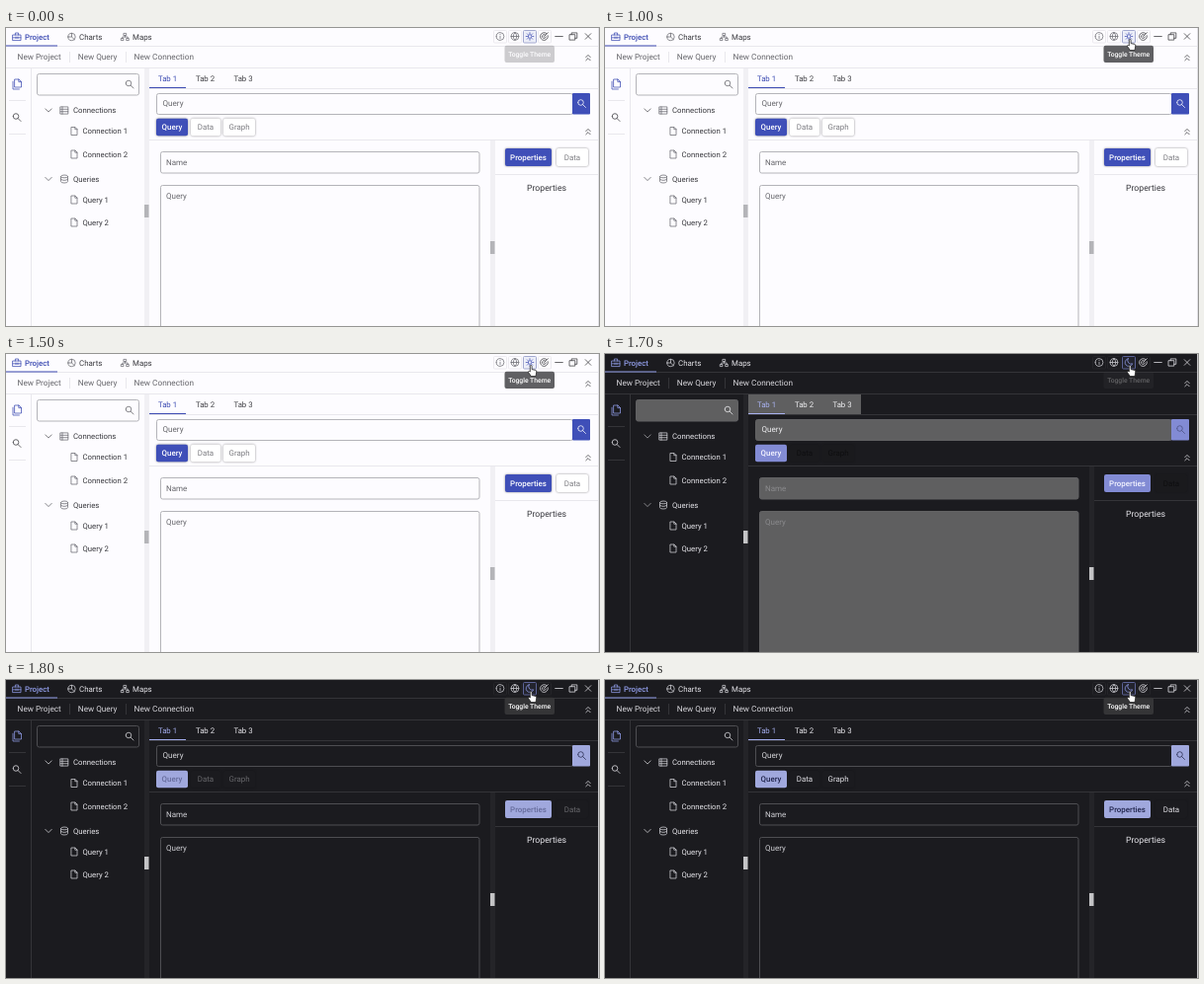
Write an HTML page that moves like this. It is 600 px wide and 302 px high and loops after 2.7 s.

```html
<!DOCTYPE html>
<html lang="en">
<head>
<meta charset="utf-8">
<title>Theme toggle</title>
<style>
html, body { margin: 0; width: 100%; height: 100%; overflow: hidden; }
svg { display: block; width: 600px; height: 302px; background: var(--bg); }
text { font: 400 7.9px Roboto, Arial, sans-serif; fill: var(--ink); text-rendering: geometricPrecision; }
.mid { text-anchor: middle; }
.bold { font-weight: 500; }
.icon { fill: none; stroke-width: .75; stroke-linecap: round; stroke-linejoin: round; }
.raised { filter: drop-shadow(0 .5px .8px var(--shade)); }
</style>
</head>
<body>
<svg id="stage" viewBox="0 0 600 302"></svg>
<script>
// Light value, then one value per 100 ms from the switch; the last one holds.
const colors = {
  bg: '#fdfcff #1b1b1f',
  line: '#e9e8ed #343438',
  gutter: '#f1f0f4 #242428',
  ink: '#38383d #e6e5ea',
  icon: '#6a6a70 #d2d2d7',
  tool: '#66666b #d8d7dc',
  primary: '#3c4bb2 #929eea',
  frame: '#eceaef #252529',
  focus: '#a3a9cf #5c6396',
  focusFill: '#eceef8 #23242e',
  field: '#fdfcff #cac9cd #5f5f60 #1b1b1f',
  edge: '#b4b4b9 #c4c3c7 #626264 #4e4e52',
  find: '#66666b #f2f2f4 #eeeef0 #d6d6da',
  label: '#66666b #6a696d #8b8b8d #cfcfd4',
  tabs: '#fdfcff #cac9cd #5f5f60 #1b1b1f',
  tabOn: '#3c4bb2 #8f9ce4 #a9b2f0 #a3acec',
  tabOff: '#404045 #f4f4f6 #f0f0f2 #e6e5ea',
  fill: '#3f4fb8 #4f5fbe #828bd4 #a0a8dd',
  onFill: '#ffffff #ffffff #f4f4ff #666c9c #2c3060 #20244c',
  lens: '#ffffff #d8dcf0 #4a4f80 #24284c',
  alt: '#ffffff #1a1a1d #1a1a1d #1b1b1f',
  onAlt: '#7c7c81 #0a0a0c #0e0e10 #68686c #b5b5ba #e2e1e6',
  shade: '#00000070 #00000030',
  chevron: '#5a5a60 #2c2c30 #a8a8ad #d8d8dc',
  tip: '#606063 #353537',
  grip: '#b4b4b8 #c4c4c6',
  rim: '#e2e1e6 #c8c8ca'
};
for (const k in colors) colors[k] = colors[k].split(' ');

const v = name => `var(--${name})`;
const text = (x, y, s, color = 'ink', size = 7.9, cls = '') =>
  `<text x="${x}" y="${y}" class="${cls}" style="fill:${v(color)};font-size:${size}px">${s}</text>`;
const rect = (x, y, w, h, fill, edge, r = 0) =>
  `<rect x="${x}" y="${y}" width="${w}" height="${h}" rx="${r}" fill="${v(fill)}" ${edge ? `stroke="${v(edge)}"` : ''}/>`;
const icon = (x, y, d, color = 'icon') =>
  `<path class="icon" transform="translate(${x} ${y})" d="${d}" style="stroke:${v(color)}"/>`;
const ring = r => `M${-r} 0a${r} ${r} 0 1 0 ${2 * r} 0a${r} ${r} 0 1 0 ${-2 * r} 0`;
const button = (x, y, w, h, s, on) =>
  `<g class="raised">${rect(x, y, w, h, on ? 'fill' : 'alt', '', 2)}</g>` +
  text(x + w / 2, y + h / 2 + 2.8, s, on ? 'onFill' : 'onAlt', 7.9, on ? 'mid bold' : 'mid');

const lens = 'M1.2 1.2L4 4M-3.8 -1a2.8 2.8 0 1 0 5.6 0a2.8 2.8 0 1 0 -5.6 0';
const page = 'M-2.7 -4H1L3 -2V4H-2.7ZM.8 -3.8V-1.8H3';
const collapse = 'M-2.2 -.4L0 -2.6L2.2 -.4M-2.2 2.8L0 .6L2.2 2.8';
const open = 'M-3.2 -1.6L0 1.6L3.2 -1.6';
const rays = [...Array(8)].map((_, i) => {
  const c = Math.cos(i * Math.PI / 4), s = Math.sin(i * Math.PI / 4);
  return `M${2.7 * c} ${2.7 * s}L${3.8 * c} ${3.8 * s}`;
}).join('');

const branch = (y, s, d) => icon(43, y, open, 'chevron') + icon(59, y, d) + text(68, y + 2.9, s, 'ink', 7.75);
const leaf = (y, s) => icon(69, y, page) + text(77.5, y + 2.9, s, 'ink', 7.75);

stage.innerHTML = [
  // Title bar
  rect(0, 18, 600, 1, 'line'), rect(0, 17.5, 52, 1, 'primary'),
  icon(11, 9, 'M-4 -2H4V3.6H-4ZM-1.6 -2V-4H1.6V-2M-4 .8H4M-1 0V1.6M1 0V1.6', 'primary'),
  text(19, 11.8, 'Project', 'primary', 7.8, 'bold'),
  icon(66.5, 9, ring(3.7) + 'M0 -3.7V0L2.7 2.6M0 0H-3.6'), text(74, 11.8, 'Charts'),
  icon(120.5, 9, 'M-1.2 -3.6H1.2V-1.4H-1.2ZM-3.8 1.5H-1.6V3.6H-3.8ZM1.6 1.5H3.8V3.6H1.6ZM0 -1.4V0M-2.7 1.5V0H2.7V1.5'),
  text(128, 11.8, 'Maps'),
  ...[493.5, 508.5, 538.5].map(x => rect(x, 2.5, 13, 12.5, 'bg', 'frame', 1)),
  icon(500, 8.5, ring(3.9) + 'M0 -.3V2M0 -2V-1.9'),
  icon(515, 8.5, ring(3.9) + 'M-3.8 0H3.8M0 -3.9Q-3.6 0 0 3.9Q3.6 0 0 -3.9'),
  rect(523.5, 2.5, 13, 12.5, 'focusFill', 'focus', 1),
  `<g id="sun">${icon(530, 8.5, ring(1.8) + rays, 'primary')}</g>`,
  `<g id="moon">${icon(530, 8.5, 'M-.8 -3.8A3.9 3.9 0 1 0 3.7 1.3A3.6 3.6 0 0 1 -.8 -3.8Z', 'primary')}</g>`,
  icon(544.5, 8.5, 'M2.2 -3.2A3.9 3.9 0 1 0 3.8 -.8M1 -1.6A1.9 1.9 0 1 0 1.8 .4M0 0L3.8 -3.8', 'ink'),
  icon(559.5, 8.5, 'M-3.8 0H3.8', 'ink'),
  icon(574, 8.5, 'M-3.6 -1.8H1.8V3.6H-3.6ZM-1.8 -1.8V-3.6H3.8V1.8H1.8', 'ink'),
  icon(589, 8.5, 'M-2.8 -2.8L2.8 2.8M2.8 -2.8L-2.8 2.8', 'ink'),

  // Toolbar
  text(11.6, 32.3, 'New Project', 'tool', 8.2), text(72.8, 32.3, 'New Query', 'tool', 8.2),
  text(129.6, 32.3, 'New Connection', 'tool', 8.25),
  rect(64, 24, 1, 11, 'line'), rect(121, 24, 1, 11, 'line'),
  icon(589, 30, collapse, 'ink'), rect(0, 40, 600, 1, 'line'),

  // Side rail and tree
  rect(25, 41, 1, 261, 'line'), rect(3, 73, 17, 1, 'line'), rect(3, 107, 17, 1, 'line'),
  icon(11, 57, 'M-2 -5H2L4.5 -2.5V3H-2ZM1.8 -5V-2.4H4.5M-4 -2.8V5H2.4', 'primary'),
  icon(11, 90.5, lens, 'ink'),
  rect(31.5, 46.5, 103, 21.5, 'field', 'edge', 2), icon(125, 57, lens, 'find'),
  branch(83.5, 'Connections', 'M-3.8 -3.6H3.8V3.6H-3.8ZM-3.8 -1.2H3.8M-3.8 1.2H3.8M-2 -3.6V3.6'),
  leaf(104.5, 'Connection 1'), leaf(128, 'Connection 2'),
  branch(153, 'Queries', 'M-3.5 -2.6A3.5 1.4 0 0 1 3.5 -2.6A3.5 1.4 0 0 1 -3.5 -2.6V2.6A3.5 1.4 0 0 0 3.5 2.6V-2.6M-3.5 0A3.5 1.4 0 0 0 3.5 0'),
  leaf(174, 'Query 1'), leaf(197, 'Query 2'),
  rect(140, 41, 5, 261, 'gutter'), rect(140, 179, 4.5, 13, 'grip'),

  // Tabs and query bar
  rect(145, 41, 114, 20, 'tabs'), rect(145, 61, 455, 1, 'line'), rect(145, 60, 37, 1, 'tabOn'),
  text(163.5, 53.8, 'Tab 1', 'tabOn', 7.8, 'mid'), text(201.5, 53.8, 'Tab 2', 'tabOff', 7.8, 'mid'),
  text(240, 53.8, 'Tab 3', 'tabOff', 7.8, 'mid'),
  rect(152.5, 66.5, 421, 21, 'field', 'edge', 2), text(158.5, 79.4, 'Query', 'find', 8.1),
  rect(573, 66, 18, 21.5, 'fill', '', 1), icon(582.5, 76.5, lens, 'lens'),
  button(152, 91.7, 32, 17.6, 'Query', true), button(187, 91.7, 30, 17.6, 'Data'), button(220, 91.7, 32, 17.6, 'Graph'),
  icon(589, 105, collapse, 'ink'), rect(145, 113, 455, 1, 'line'),

  // Form
  rect(156.5, 125.5, 322.5, 21.5, 'field', 'edge', 2), text(162, 139.2, 'Name', 'label', 8),
  rect(156.5, 159.5, 322.5, 150, 'field', 'edge', 2), text(162, 173.2, 'Query', 'label', 8),
  rect(490, 114, 5, 188, 'gutter'), rect(490, 216, 4.5, 13, 'grip'),
  button(505, 122, 47, 18, 'Properties', true), button(557, 122, 32, 18, 'Data'),
  rect(495, 148, 105, 1, 'line'), text(547, 165, 'Properties', 'ink', 8.7, 'mid'),
  rect(599, 0, 1, 302, 'rim'),

  `<g id="tip">${rect(504.5, 17.7, 50.5, 17.4, 'tip', '', 2)}
  <text x="529.7" y="28.8" class="mid bold" style="font-size:6.8px;fill:#fff">Toggle Theme</text></g>`,
  `<path id="hand" transform="translate(528 11)" fill="#fff" stroke="#222" stroke-width=".8" stroke-linejoin="round"
  d="M2.3 7V1.4a.9.9 0 0 1 1.8 0V4.6L8 5.4Q9 5.8 8.8 7L8 11.6H3.4L.5 7.6Q.4 6.4 1.3 6.5Z"/>`
].join('');

const $ = id => document.getElementById(id);
const show = (id, on) => $(id).style.display = on ? '' : 'none';
const hold = (list, i) => list[Math.min(i, list.length - 1)];

function draw(now) {
  const step = Math.floor(now % 2700 / 100);
  const dark = step >= 16;
  for (const k in colors) stage.style.setProperty('--' + k, hold(colors[k], dark ? step - 15 : 0));
  $('tip').style.opacity = dark ? hold([.12, .3, 1], step - 16) : hold([.3, .58, .85, 1], step);
  show('sun', !dark);
  show('moon', dark);
  show('hand', step >= 8);
}

const start = performance.now();
(function loop() {
  draw(performance.now() - start);
  requestAnimationFrame(loop);
})();
</script>
</body>
</html>
```
